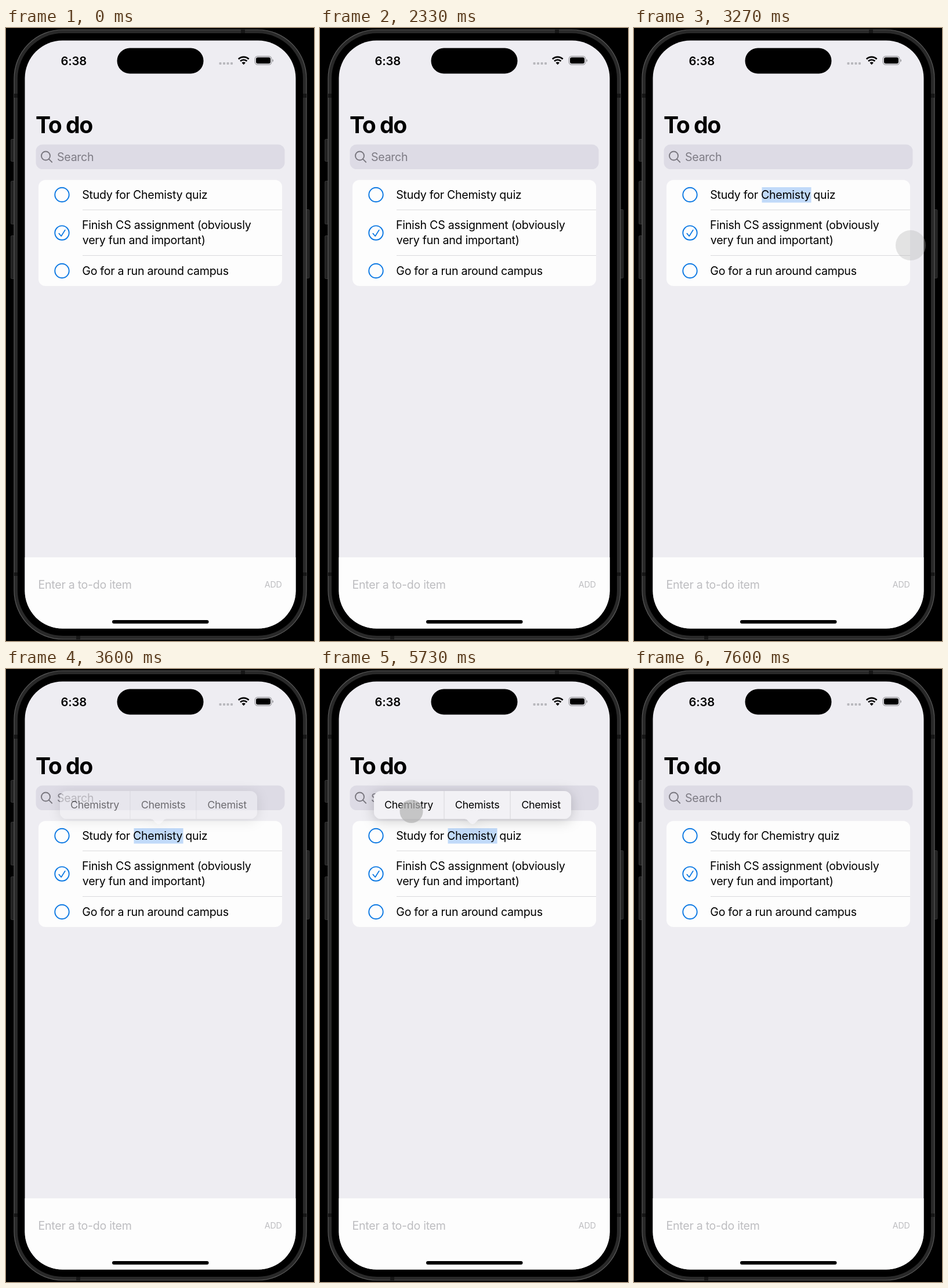
Animation, 531 px wide and 1055 px high, one loop 8 s. Source, as an HTML page:

```html
<!DOCTYPE html>
<html lang="en">
<head>
<meta charset="utf-8">
<title>To do</title>
<style>
  html, body { margin: 0; width: 100%; height: 100%; overflow: hidden; background: #000; }
  svg { display: block; width: 100%; height: 100%; }
  text { font: 19.6px Inter, "Open Sans", sans-serif; font-optical-sizing: none; letter-spacing: -.28px; white-space: pre; }
  .title { font-size: 39.2px; font-weight: 700; letter-spacing: -1.45px; }
  .clock { font-size: 20.2px; font-weight: 600; letter-spacing: -.15px; }
  .add { font-size: 14.2px; letter-spacing: -.1px; }
  .hint { fill: #bdbdc0; }
  .option { font-size: 17.9px; letter-spacing: -.25px; text-anchor: middle; }
  .line { fill: none; stroke-linecap: round; stroke-linejoin: round; }
</style>
</head>
<body>
<svg viewBox="0 0 531 1055">
  <defs>
    <clipPath id="screen"><rect x="32.5" y="21.5" width="467" height="1012" rx="65"/></clipPath>
    <filter id="shadow" x="-20%" y="-60%" width="140%" height="240%">
      <feDropShadow dx="0" dy="3" stdDeviation="11" flood-color="#000" flood-opacity=".2"/>
    </filter>
  </defs>

  <!-- phone body -->
  <rect width="531" height="1055"/>
  <g fill="#222" stroke="#3c3c3c" stroke-width=".8">
    <rect x="8.5" y="191.5" width="8" height="38" rx="1.5"/>
    <rect x="8.5" y="263.5" width="8" height="74" rx="1.5"/>
    <rect x="8.5" y="357.5" width="8" height="74" rx="1.5"/>
    <rect x="515" y="312.5" width="8" height="118" rx="1.5"/>
  </g>
  <rect x="14" y="3" width="504" height="1049" rx="84" fill="#292929" stroke="#5a5a5a" stroke-width="1.2"/>
  <g fill="#161616">
    <path d="M14 113h6v7h-6zM512 113h6v7h-6zM14 937h6v6h-6zM512 937h6v6h-6zM405 3h7v6h-7zM121 1046h7v6h-7z"/>
  </g>
  <rect x="20" y="9" width="492" height="1037" rx="78"/>

  <!-- app -->
  <g clip-path="url(#screen)">
    <rect x="32" y="21" width="468" height="1013" fill="#eeedf2"/>
    <rect x="32" y="911" width="468" height="123" fill="#fdfdfd"/>
  </g>
  <rect x="191.5" y="34.5" width="149" height="44" rx="22"/>
  <rect x="183" y="1019" width="166.5" height="6" rx="3"/>
  <text class="clock" x="94.5" y="63.6">6:38</text>
  <g fill="#b8b8bd">
    <rect x="367.5" y="59" width="4" height="4" rx="1"/><rect x="374" y="59" width="4" height="4" rx="1"/>
    <rect x="380.5" y="59" width="4" height="4" rx="1"/><rect x="387" y="59" width="4" height="4" rx="1"/>
  </g>
  <path fill="none" stroke="#000" stroke-width="2.7" d="M400.8 53.4a13 13 0 0 1 17.8 0M404 57a8.3 8.3 0 0 1 11.4 0"/>
  <path d="M409.7 63.2l-3.2 -3.5a4.6 4.6 0 0 1 6.4 0z"/>
  <rect x="429.2" y="48.6" width="28.6" height="14.6" rx="4.6" fill="none" stroke="#96969a" stroke-width="1.2"/>
  <rect x="431" y="50.5" width="25" height="10.8" rx="3"/>
  <path fill="#96969a" d="M459.3 53.6q1.8 .6 1.8 2.4t-1.8 2.4z"/>

  <text class="title" x="51" y="181">To do</text>
  <rect x="51.5" y="200.5" width="429" height="42.5" rx="11.5" fill="#dddbe5"/>
  <g class="line" stroke="#77757d" stroke-width="1.9">
    <circle cx="68.5" cy="220" r="7.5"/><path d="M74 225.6l5.2 5.2"/>
  </g>
  <text x="88" y="229.4" fill="#7d7b84">Search</text>

  <rect x="56" y="261.5" width="420" height="182.5" rx="12" fill="#fdfdfd"/>
  <path fill="#d9d9dc" d="M132 312.5h344v1h-344zM132 391h344v1h-344z"/>
  <g class="line" stroke="#0b78e3" stroke-width="1.9">
    <circle cx="96.5" cy="287" r="12.2"/>
    <circle cx="96.5" cy="352.6" r="12.2"/>
    <circle cx="96.5" cy="418" r="12.2"/>
    <path stroke-width="1.7" d="M91.3 353.6l3.9 4.6 6.6 -10.4"/>
  </g>
  <rect id="selection" x="220.5" y="274" width="85" height="26.5" fill="#c1daf9"/>
  <text id="task" x="131.3" y="293.8"></text>
  <rect id="caret" x="312.6" y="274.5" width="2.3" height="26.5" rx="1" fill="#0b78e3"/>
  <text x="131" y="346.2">Finish CS assignment (obviously</text>
  <text x="131.8" y="372.3">very fun and important)</text>
  <text x="131.3" y="424.8">Go for a run around campus</text>

  <text class="hint" x="55.5" y="964.8">Enter a to-do item</text>
  <text class="hint add" x="445.7" y="962.6">ADD</text>

  <!-- spelling suggestions -->
  <g id="menu">
    <path filter="url(#shadow)" fill="#f2f1f5" d="M105 210H421a12 12 0 0 1 12 12V246a12 12 0 0 1 -12 12H276c-5 0 -8 8.5 -13 8.5s-8 -8.5 -13 -8.5H105a12 12 0 0 1 -12 -12V222a12 12 0 0 1 12 -12z"/>
    <path fill="#d6d6da" d="M213.5 210h1v48h-1zM327.5 210h1v48h-1z"/>
    <text class="option" x="153" y="240.3">Chemistry</text>
    <text class="option" x="271" y="240.3">Chemists</text>
    <text class="option" x="381" y="240.3">Chemist</text>
  </g>
  <circle id="touch" fill="#b2b2b2"/>
</svg>
<script>
const LOOP = 8000;
const el = id => document.getElementById(id);
const set = (id, attrs) => { for (const k in attrs) el(id).setAttribute(k, attrs[k]); };

// Piecewise linear track of [time, value] pairs, held at both ends.
function track(t, ...keys) {
  if (t <= keys[0][0]) return keys[0][1];
  for (let i = 1; i < keys.length; i++) {
    const [t0, v0] = keys[i - 1], [t1, v1] = keys[i];
    if (t < t1) return v0 + (v1 - v0) * (t - t0) / (t1 - t0);
  }
  return keys[keys.length - 1][1];
}

// Double tap on the misspelt word, then leave to the right.
const tapWord = t => ({
  cx: track(t, [2330, 330], [2600, 298], [2990, 298], [3270, 477]),
  cy: track(t, [2330, 302], [2600, 287.5], [2990, 287.5], [3270, 374]),
  r: track(t, [2600, 26], [2670, 19.5], [2930, 19.5], [3060, 26]),
  opacity: track(t, [2330, 0], [2470, .45], [2600, .45], [2670, .75],
    [2930, .75], [3060, .45], [3200, .42], [3270, .35], [3420, 0])
});

// Pick the first suggestion.
const tapOption = t => ({
  cx: track(t, [5270, 220], [5600, 157.5]),
  cy: track(t, [5270, 322], [5600, 245]),
  r: track(t, [5600, 26], [5700, 20], [5870, 20], [6000, 26]),
  opacity: track(t, [5270, 0], [5400, .45], [5600, .45], [5700, .7],
    [5870, .7], [6000, .45], [6200, 0])
});

function draw(t) {
  const fixed = t >= 6130;
  el('task').textContent = `Study for ${fixed ? 'Chemistry' : 'Chemisty'} quiz`;
  set('selection', { opacity: t >= 2940 && !fixed ? 1 : 0 });
  set('menu', { opacity: track(t, [3500, 0], [3700, 1], [5870, 1], [6060, 0]) });
  set('caret', {
    opacity: fixed ? track(t, [6400, 1], [6600, 0], [6860, 0], [7070, 1], [7390, 1], [7600, 0]) : 0
  });
  set('touch', t < 4500 ? tapWord(t) : tapOption(t));
}

const start = performance.now();
function tick() {
  draw((performance.now() - start) % LOOP);
  requestAnimationFrame(tick);
}
tick();
</script>
</body>
</html>
```
